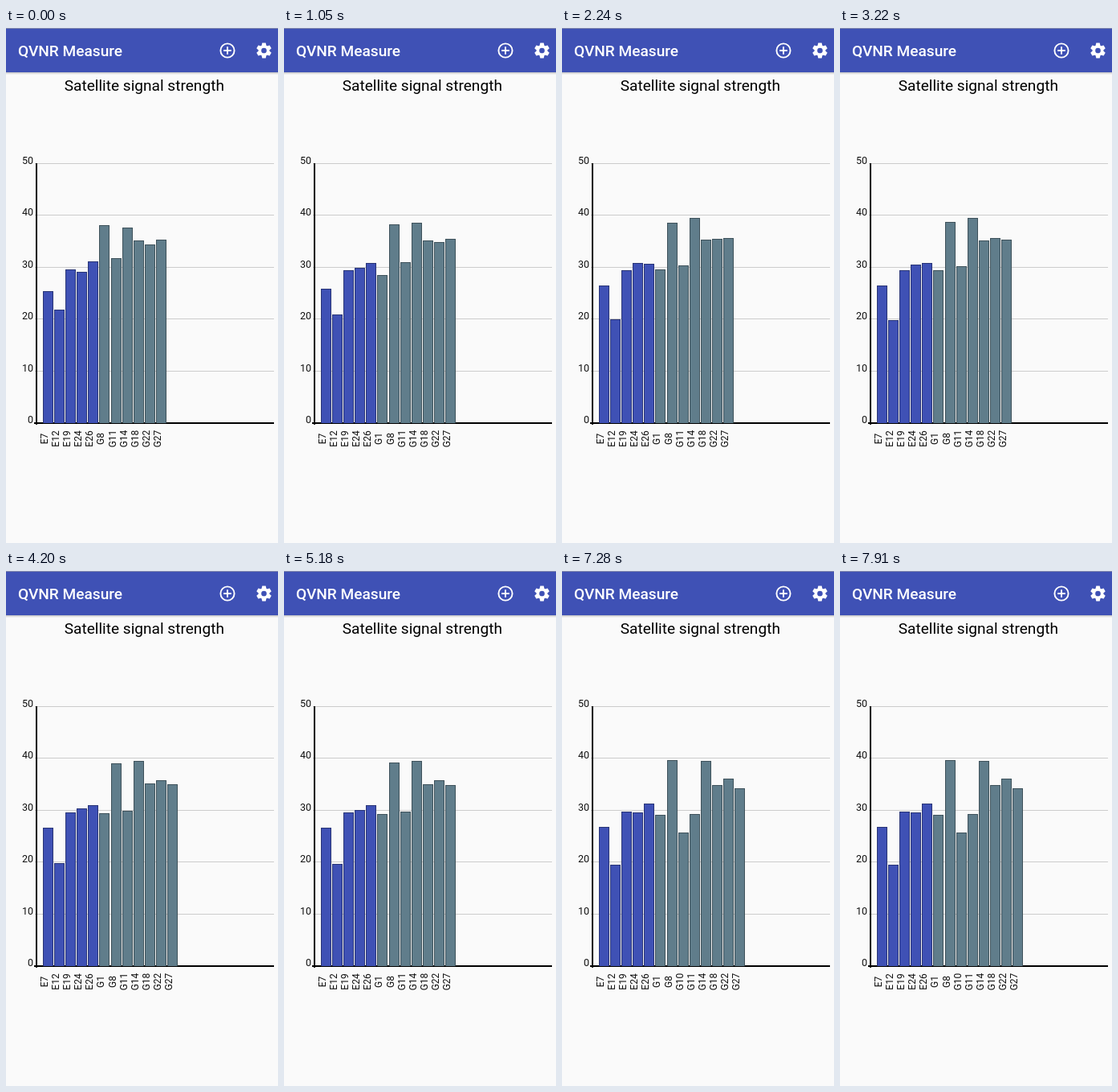
An HTML page for the animation above (8 s loop, 339 by 640 pixels).

```html
<!DOCTYPE html>
<html lang="en">
<head>
<meta charset="utf-8">
<style>
  html, body { margin: 0; width: 100%; height: 100%; overflow: hidden; background: #fafafa; }
  svg { display: block; width: 339px; height: 640px; font-family: Roboto, sans-serif; }
</style>
</head>
<body>
<svg viewBox="0 0 339 640">
  <defs>
    <linearGradient id="shade" x2="0" y2="1">
      <stop stop-color="#000" stop-opacity=".22"/>
      <stop offset="1" stop-color="#000" stop-opacity="0"/>
    </linearGradient>
    <path id="tooth" d="M-3.2-5L-2.2-9.4H2.2L3.2-5Z"/>
  </defs>
  <rect width="339" height="640" fill="#fafafa"/>
  <rect y="55" width="339" height="3" fill="url(#shade)"/>
  <rect width="339" height="55" fill="#3f51b5"/>
  <rect width="339" height="1" fill="#7f86ad"/>
  <text x="15" y="35" font-size="19.1" font-weight="500" fill="#fff">QVNR Measure</text>
  <g transform="translate(276 28)" fill="none" stroke="#fff" stroke-width="1.9">
    <circle r="8.6"/>
    <path d="M-4.8 0H4.8M0-4.8V4.8"/>
  </g>
  <g id="gear" transform="translate(321.5 28)" fill="#fff">
    <circle r="5.1" fill="none" stroke="#fff" stroke-width="3.5"/>
  </g>
  <text x="172.3" y="78" font-size="19.1" text-anchor="middle">Satellite signal strength</text>
  <g id="grid" font-size="12.5" text-anchor="end" fill="#111"></g>
  <path d="M38 168V493M35 491H334" stroke="#000" stroke-width="2"/>
  <g id="bars"></g>
  <g id="names" font-size="12" text-anchor="middle" fill="#111"></g>
</svg>
<script>
const $ = id => document.getElementById(id);
const BASE = 491, LOOP = 8000, SETTLED = 2, LAST = 7;
const updates = [0, 1050, 2170, 3150, 4200, 5040, 6300, 7280];

// Top edge of each bar at the first, the settled and the last update
const satellites = {
  E7: [327, 320, 318], E12: [350, 362, 365], E19: [300, 301, 299],
  E24: [303, 292, 300], E26: [290, 293, 289], G1: [314, 300, 303],
  G8: [245, 242, 235], G10: [325, 325, 325], G11: [286, 295, 302],
  G14: [248, 236, 236], G18: [264, 263, 266], G22: [269, 262, 258],
  G27: [263, 261, 270]
};
const appearsAt = { G1: 1, G10: LAST };

for (let angle = 0; angle < 360; angle += 60)
  $("gear").innerHTML += `<use href="#tooth" transform="rotate(${angle})"/>`;

for (let value = 0; value <= 50; value += 10) {
  const y = Math.floor(BASE - .1 - value * 6.45);
  $("grid").innerHTML += `<text x="34" y="${y + .5}">${value}</text>` +
    (value ? `<path d="M36 ${y + .5}H334" stroke="#ccc"/>` : "");
}

const mix = (a, b, k) => a + (b - a) * k;

function topAt(update, [first, settled, last]) {
  return Math.round(update < SETTLED
    ? mix(first, settled, update / SETTLED)
    : mix(settled, last, (update - SETTLED) / (LAST - SETTLED)));
}

function show(update) {
  const visible = Object.keys(satellites).filter(name => update >= (appearsAt[name] ?? 0));
  let bars = "", names = "";
  visible.forEach((name, i) => {
    const x = Math.round(46 + i * 14.09), y = topAt(update, satellites[name]);
    const color = name[0] === "E" ? "#3f51b5" : "#607d8b";
    bars += `<path d="M${x} ${BASE}V${y}h13V${BASE}" fill="${color}"/>` +
      `<path d="M${x + .5} ${BASE}V${y + .5}h12V${BASE}" fill="none" stroke="#000" stroke-opacity=".35"/>`;
    names += `<text transform="translate(${x + 6} 510.5) rotate(-90)">${name}</text>`;
  });
  $("bars").innerHTML = bars;
  $("names").innerHTML = names;
}

let shown;
function frame() {
  const time = performance.now() % LOOP;
  const update = updates.findLastIndex(start => start <= time);
  if (update !== shown) show(shown = update);
  requestAnimationFrame(frame);
}
frame();
</script>
</body>
</html>
```
